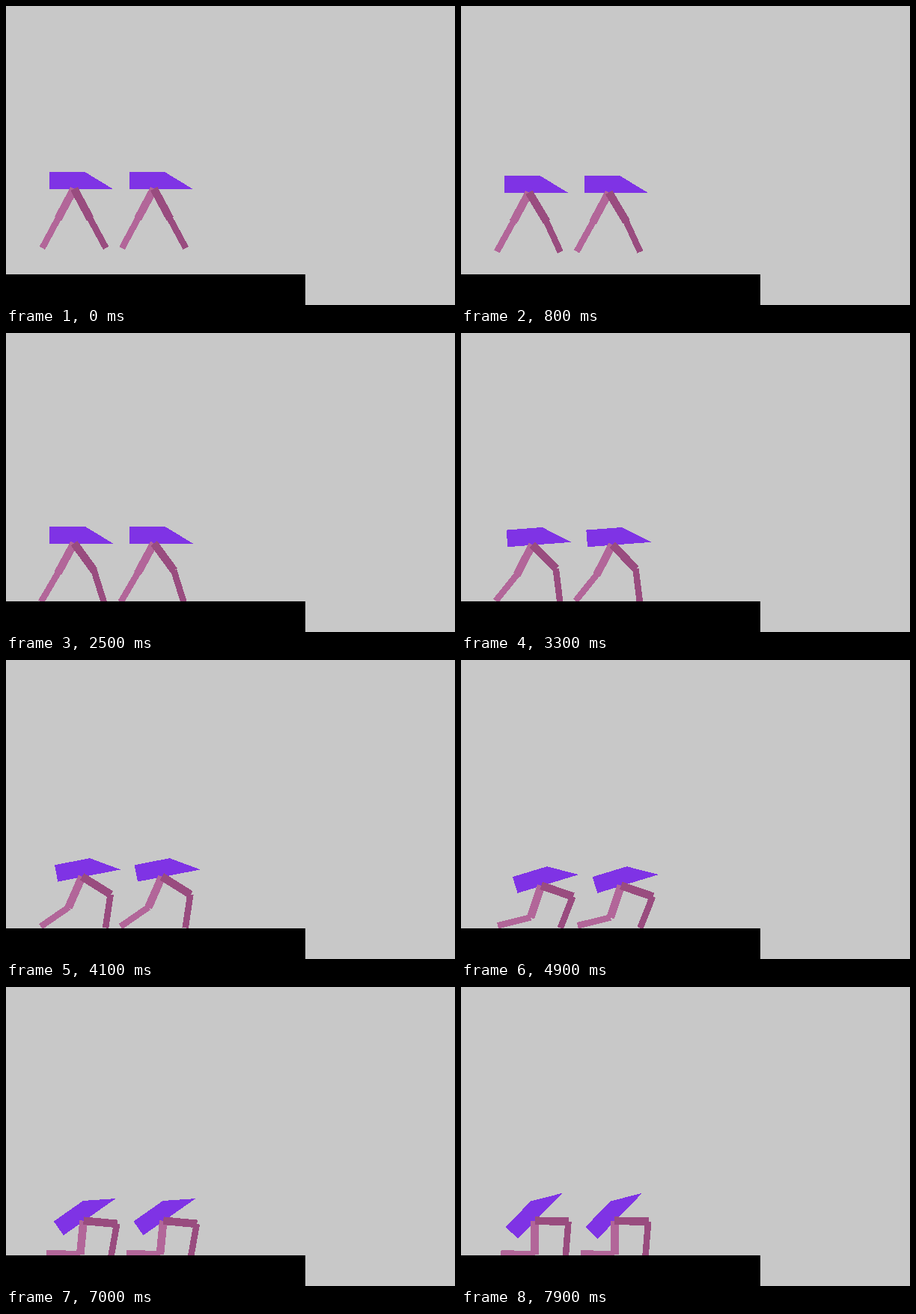
An HTML page for the animation above (8 s loop, 600x400 px).

```html
<!DOCTYPE html>
<html lang="en">
<head>
<meta charset="utf-8">
<title>Two walkers</title>
<style>
  html, body { margin: 0; width: 100%; height: 100%; overflow: hidden; background: #c8c8c8; }
  svg { display: block; shape-rendering: crispEdges; }
</style>
</head>
<body>
<svg width="600" height="400" viewBox="0 0 600 400">
  <defs>
    <g id="walker">
      <polygon id="hull" points="-40,-12 8,-12 45.3,10.7 -40,10.7" fill="#7f33e5"/>
      <g id="back" fill="#b26699"></g>
      <g id="front" fill="#994c7f"></g>
    </g>
  </defs>
  <use href="#walker"/>
  <use href="#walker" x="106.67"/>
  <rect y="359" width="400" height="41"/>
</svg>
<script>
const LOOP = 8, STEP = .1, END = 7.9, LAND = 2.4;
const LEG = 44.8, SPREAD = 28.2;

// Leg angles are degrees from straight down, positive to the right.
// A pose is: hip x, hip y, hull tilt, front thigh, front shin, back thigh, back shin
const landed = [91, 281.2, 0, 36, 17.5, -28.5, -30.2];
const crouch = [
  { at: LAND, pose: landed },
  { at: 4.1, pose: [101.7, 289.8, 10.9, 58, -8.5, -23.7, -55.4] },
  { at: 4.9, pose: [107.1, 301.8, 16.9, 71, -21.6, -18.2, -76] },
  { at: 6.1, pose: [107.2, 312.7, 25.6, 80, -15.5, -11, -91.5] },
  { at: END, pose: [98.7, 312.7, 45.7, 88.6, -4.5, 0, -91.5] }
];

// Free fall while the straight legs begin to fold
function fall(t) {
  const y = 244.5 + 1.67 * t + 5.56 * t * t;
  const fold = landed.slice(3).map((angle, i) => {
    const from = i < 2 ? SPREAD : -SPREAD;
    return from + (angle - from) * t / LAND;
  });
  return [landed[0], y, 0, ...fold];
}

function slope(i, c) {
  const a = crouch[i], b = crouch[i + 1];
  return (b.pose[c] - a.pose[c]) / (b.at - a.at);
}

// Speed at a key; a part that comes to rest arrives with none
function speed(i, c) {
  if (i === 0) return 0;
  if (i === crouch.length - 1) return slope(i - 1, c);
  const before = slope(i - 1, c), after = slope(i, c);
  if (after === 0) return 0;
  const a = crouch[i].at - crouch[i - 1].at, b = crouch[i + 1].at - crouch[i].at;
  return (b * before + a * after) / (a + b);
}

// Smooth curve through the crouch keys
function sink(t) {
  const i = crouch.findIndex((key, k) => k === crouch.length - 2 || t < crouch[k + 1].at);
  const a = crouch[i], b = crouch[i + 1];
  const h = b.at - a.at, s = (t - a.at) / h, r = 1 - s;
  return a.pose.map((v, c) =>
    v * r * r * (1 + 2 * s) + b.pose[c] * s * s * (1 + 2 * r) +
    h * s * r * (speed(i, c) * r - speed(i + 1, c) * s));
}

function addLeg(id) {
  return [10.67, 8.53].map(width => {
    const bar = document.createElementNS('http://www.w3.org/2000/svg', 'rect');
    bar.setAttribute('x', -width / 2);
    bar.setAttribute('width', width);
    bar.setAttribute('height', LEG + .5);
    document.getElementById(id).append(bar);
    return bar;
  });
}

function place(el, x, y, angle, extra = '') {
  el.setAttribute('transform', `translate(${x} ${y}) rotate(${-angle}) ${extra}`);
}

function poseLeg([thigh, shin], x, y, upper, lower) {
  const a = upper * Math.PI / 180;
  place(thigh, x, y, upper);
  place(shin, x + LEG * Math.sin(a), y + LEG * Math.cos(a), lower);
}

const hull = document.getElementById('hull');
const back = addLeg('back'), front = addLeg('front');

function draw(seconds) {
  const t = Math.min(END, Math.floor(seconds % LOOP / STEP + 1e-6) * STEP);
  const [x, y, tilt, frontThigh, frontShin, backThigh, backShin] = t < LAND ? fall(t) : sink(t);
  place(hull, x, y, tilt, 'translate(6.9 -10.2)');
  poseLeg(back, x, y, backThigh, backShin);
  poseLeg(front, x, y, frontThigh, frontShin);
}

const start = performance.now();
function tick() {
  draw((performance.now() - start) / 1000);
  requestAnimationFrame(tick);
}
tick();
</script>
</body>
</html>
```
